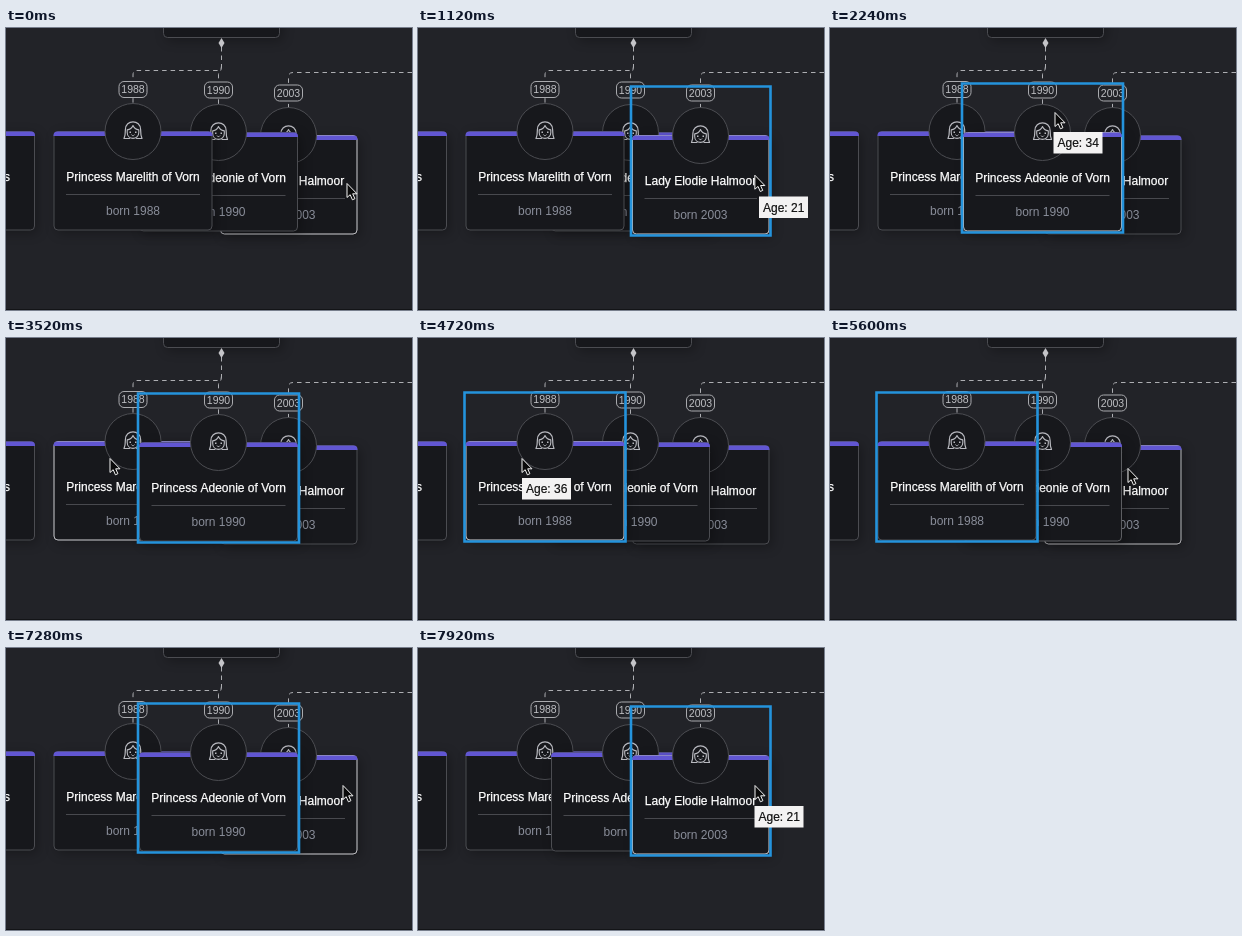
An HTML page with a canvas for the animation above (8000 ms loop, 406 by 282 pixels).

```html
<!DOCTYPE html>
<html lang="en">
<head>
<meta charset="utf-8">
<title>Family tree</title>
<style>
  html, body { margin: 0; width: 100%; height: 100%; overflow: hidden; background: #222328; }
  canvas { display: block; width: 406px; height: 282px; }
</style>
</head>
<body>
<canvas id="stage"></canvas>
<script>
const W = 406, H = 282, LOOP = 8000;
const canvas = document.getElementById('stage');
const ctx = canvas.getContext('2d');
const dpr = window.devicePixelRatio || 1;
canvas.width = W * dpr;
canvas.height = H * dpr;

const BG = '#222328', CARD = '#17181c', EDGE = '#4b4c51', PURPLE = '#6156d2';
const LINK = '#adaeb2', BLUE = '#2493dc', ICON = '#b9bac0';
const FONT = '"Liberation Sans", Arial, sans-serif';

const cards = {
  A: { x: 48, w: 158, cx: 127, top: 103.5, name: 'Princess Marelith of Vorn', year: 1988, labelY: 61.5 },
  B: { x: 133.5, w: 158, cx: 212.5, top: 104.5, name: 'Princess Adeonie of Vorn', year: 1990, labelY: 62 },
  C: { x: 214.5, w: 136.5, cx: 282.5, top: 107.5, name: 'Lady Elodie Halmoor', year: 2003, labelY: 65 }
};

// [time, card]
const clicks = [[640, 'C'], [2140, 'B'], [4000, 'A'], [6160, 'B'], [7740, 'C']];
const hovers = [[-500, 'C'], [1520, 'B'], [3120, 'A'], [5360, 'B'], [5500, 'C'], [5740, 'B'], [7100, 'C']];
// [time, x, y]
const pointer = [
  [0, 341, 155], [400, 341, 149], [1040, 341, 149], [1760, 223, 84], [2140, 223, 84],
  [2240, 225, 84], [2880, 225, 84], [3440, 104, 120], [5120, 104, 120], [5600, 298, 130],
  [5920, 255, 123], [6960, 255, 123], [7280, 337, 137]
];
// [from, to, x, y, text]
const tips = [
  [400, 1280, 341, 168.5, 'Age: 21'], [1920, 2960, 223.5, 104, 'Age: 34'],
  [3680, 5200, 104, 140, 'Age: 36'], [6480, 7040, 254.5, 144, 'Age: 34'],
  [7440, LOOP, 336.5, 158, 'Age: 21']
];

const clamp = v => Math.max(0, Math.min(1, v));
const smooth = p => p * p * (3 - 2 * p);

function stroke(color, width = 1) {
  ctx.strokeStyle = color;
  ctx.lineWidth = width;
  ctx.stroke();
}

// weight adds a hairline that thickens the letters
function text(str, x, y, size, color, align = 'center', weight = 0) {
  ctx.font = size + 'px ' + FONT;
  ctx.textAlign = align;
  ctx.fillStyle = ctx.strokeStyle = color;
  ctx.fillText(str, x, y);
  if (weight) {
    ctx.lineWidth = weight;
    ctx.strokeText(str, x, y);
  }
}

function box(x, y, w, h, r) {
  ctx.beginPath();
  ctx.roundRect(x, y, w, h, r);
}

function panel(x, y, w, h) {
  ctx.save();
  ctx.shadowColor = 'rgba(0,0,0,.3)';
  ctx.shadowBlur = 12 * dpr;
  ctx.shadowOffsetX = 3 * dpr;
  ctx.shadowOffsetY = 3 * dpr;
  box(x, y, w, h, 4);
  ctx.fillStyle = CARD;
  ctx.fill();
  ctx.restore();
}

function frame(x, y, w, h, glow) {
  box(x, y, w, h, 4);
  stroke(EDGE);
  if (glow > 0) {
    ctx.globalAlpha = glow;
    stroke('#b6b6ba');
    ctx.globalAlpha = 1;
  }
  box(x - 0.5, y, w + 1, 4.5, [4, 4, 0, 0]);
  ctx.fillStyle = PURPLE;
  ctx.fill();
}

function face(x, y) {
  ctx.save();
  ctx.translate(x, y);
  ctx.lineJoin = ctx.lineCap = 'round';
  // hair
  ctx.beginPath();
  ctx.moveTo(-3.5, 8);
  ctx.lineTo(-9, 8);
  ctx.quadraticCurveTo(-7.6, 5, -7.6, -1);
  ctx.bezierCurveTo(-7.6, -11.3, 7.6, -11.3, 7.6, -1);
  ctx.quadraticCurveTo(7.6, 5, 9, 8);
  ctx.lineTo(3.5, 8);
  stroke(ICON, 1.2);
  // parting and chin
  ctx.beginPath();
  ctx.moveTo(0, -5);
  ctx.quadraticCurveTo(-1.5, -1.2, -5.8, -0.6);
  ctx.lineTo(-5.8, 2);
  ctx.bezierCurveTo(-5.8, 9.8, 5.8, 9.8, 5.8, 2);
  ctx.lineTo(5.8, -0.6);
  ctx.quadraticCurveTo(1.5, -1.2, 0, -5);
  stroke(ICON, 1.1);
  ctx.fillStyle = ICON;
  ctx.fillRect(-3.5, 1, 1.5, 1.5);
  ctx.fillRect(2, 1, 1.5, 1.5);
  ctx.beginPath();
  ctx.arc(0, 3.6, 1.6, 0.5, Math.PI - 0.5);
  stroke(ICON, 0.9);
  ctx.restore();
}

function drawCard(c, glow) {
  const { x, w, cx, top } = c;
  panel(x, top, w, 98.5);
  frame(x, top, w, 98.5, glow);
  ctx.beginPath();
  ctx.arc(cx, top, 28, 0, Math.PI * 2);
  ctx.fillStyle = CARD;
  ctx.fill();
  stroke(EDGE);
  face(cx, top - 1);
  text(c.name, cx, top + 49.5, 12, '#fff', 'center', 0.25);
  ctx.fillStyle = '#48494e';
  ctx.fillRect(x + 12, Math.round(top + 62), w - 24, 1);
  text('born ' + c.year, cx, top + 83.5, 12, '#898d99');
}

function drawOutline(c, alpha) {
  ctx.globalAlpha = alpha;
  ctx.beginPath();
  ctx.rect(c.x - 1.5, c.top - 49, c.w + 3, 149);
  stroke(BLUE, 2.6);
  ctx.globalAlpha = 1;
}

function drawLinks() {
  ctx.setLineDash([4.5, 4]);
  ctx.beginPath();
  ctx.moveTo(215.5, 19);
  ctx.lineTo(215.5, 38);
  ctx.quadraticCurveTo(215.5, 42.5, 211, 42.5);
  ctx.lineTo(131, 42.5);
  ctx.quadraticCurveTo(127, 42.5, 127, 47);
  ctx.lineTo(127, 76);
  ctx.moveTo(215.5, 38);
  ctx.quadraticCurveTo(215.5, 42.5, 214, 43);
  ctx.quadraticCurveTo(212.5, 44, 212.5, 47);
  ctx.lineTo(212.5, 76);
  ctx.moveTo(W, 44.5);
  ctx.lineTo(287, 44.5);
  ctx.quadraticCurveTo(282.5, 44.5, 282.5, 49);
  ctx.lineTo(282.5, 80);
  stroke(LINK);
  ctx.setLineDash([]);

  ctx.beginPath();
  ctx.moveTo(215.5, 10);
  ctx.lineTo(218.5, 15);
  ctx.lineTo(215.5, 20);
  ctx.lineTo(212.5, 15);
  ctx.fillStyle = '#c4c4c8';
  ctx.fill();

  for (const c of Object.values(cards)) {
    box(c.cx - 14, c.labelY - 8, 28, 16, 5);
    ctx.fillStyle = BG;
    ctx.fill();
    stroke('#a9aaae');
    text(c.year, c.cx, c.labelY + 3.7, 10.5, '#bfc0c4');
  }
}

function drawTip(x, y, str) {
  ctx.fillStyle = '#f3f2f2';
  ctx.fillRect(x, y, 49, 21.5);
  text(str, x + 4, y + 15.3, 12, '#111', 'left', 0.2);
}

function drawPointer(x, y) {
  ctx.save();
  ctx.translate(x, y + 0.5);
  ctx.beginPath();
  [[0, 0], [0, 14], [3.2, 11.2], [5.4, 16.3], [7.9, 15.2], [5.7, 10.3], [10, 10.3]]
    .forEach(p => ctx.lineTo(...p));
  ctx.closePath();
  ctx.fillStyle = '#0a0a0a';
  ctx.fill();
  ctx.lineJoin = 'round';
  stroke('#f4f4f4');
  ctx.restore();
}

function pointerAt(t) {
  const i = pointer.findIndex(k => k[0] > t);
  if (i < 0) return pointer[pointer.length - 1].slice(1);
  const [t0, x0, y0] = pointer[i - 1], [t1, x1, y1] = pointer[i];
  const p = smooth((t - t0) / (t1 - t0));
  return [x0 + (x1 - x0) * p, y0 + (y1 - y0) * p];
}

function glowOf(id, t) {
  let glow = 0;
  hovers.forEach(([from, who], i) => {
    if (who !== id) return;
    const to = i + 1 < hovers.length ? hovers[i + 1][0] : Infinity;
    glow = Math.max(glow, clamp((t - from) / 120) * (1 - clamp((t - to) / 120)));
  });
  return glow;
}

function draw(t) {
  ctx.setTransform(dpr, 0, 0, dpr, 0, 0);
  ctx.fillStyle = BG;
  ctx.fillRect(0, 0, W, H);

  panel(157.5, -40, 116, 49.5);
  box(157.5, -40, 116, 49.5, 4);
  stroke(EDGE);
  drawLinks();

  panel(-120, 103.5, 148.5, 98.5);
  frame(-120, 103.5, 148.5, 98.5, 0);
  text('s', 4, 153, 12, '#fff', 'right', 0.25);

  // each click brings its card to the front
  let order = ['C', 'B', 'A'], chosen = null;
  for (const click of clicks) {
    if (t < click[0]) break;
    chosen = click;
    order = order.filter(id => id !== click[1]).concat(click[1]);
  }
  order.forEach(id => drawCard(cards[id], glowOf(id, t)));
  if (chosen) drawOutline(cards[chosen[1]], clamp(0.4 + (t - chosen[0]) / 140));

  for (const [from, to, x, y, str] of tips) {
    if (t >= from && t < to) drawTip(x, y, str);
  }
  drawPointer(...pointerAt(t));

  ctx.fillStyle = '#131417';
  ctx.fillRect(0, H - 1, W, 1);
}

const start = performance.now();
function tick() {
  draw((performance.now() - start) % LOOP);
  requestAnimationFrame(tick);
}
tick();
</script>
</body>
</html>
```
